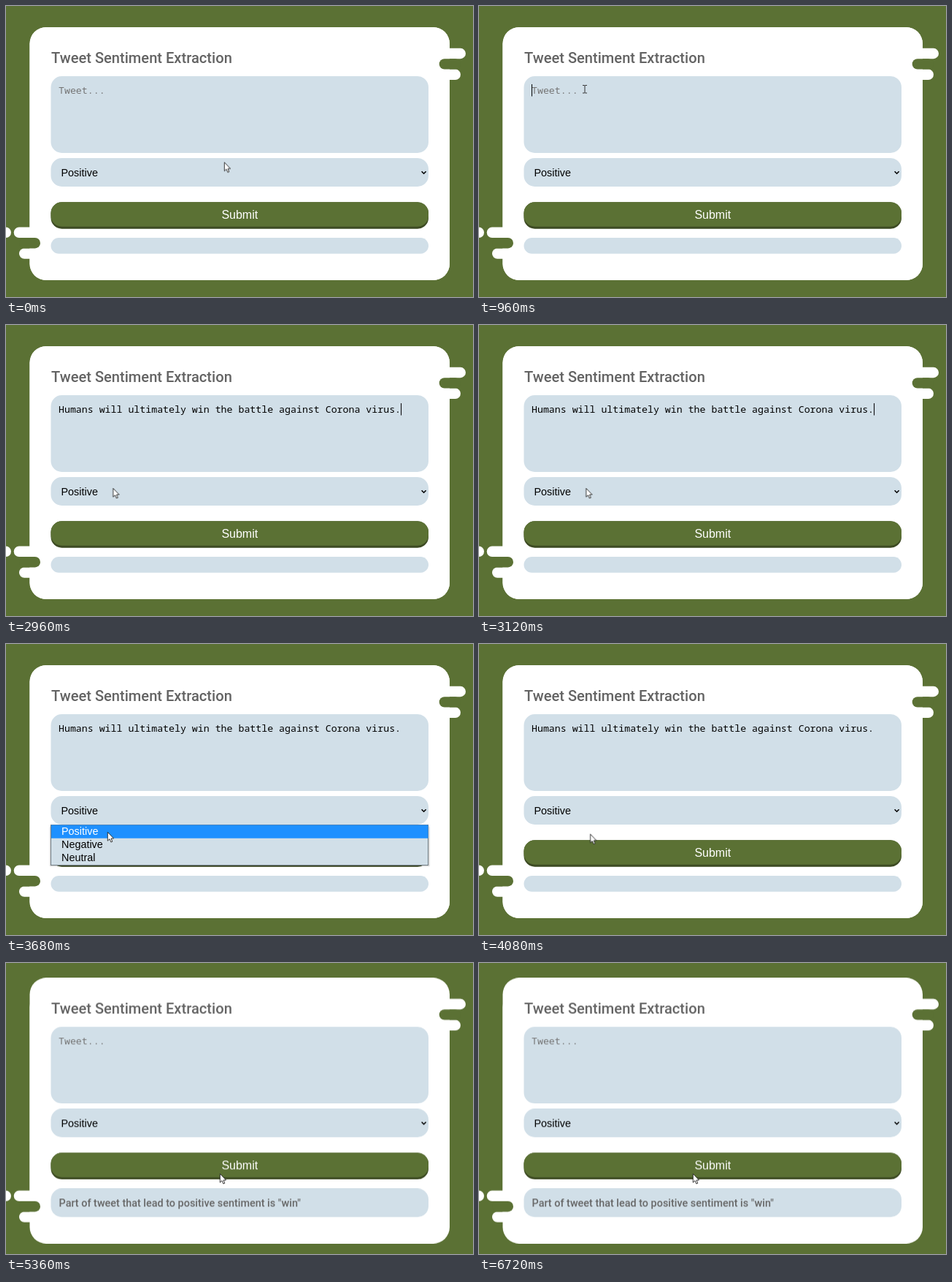
Recreate the animation shown at these times as an HTML page. Size 640 by 398 pixels, loop 7920 ms.

```html
<!DOCTYPE html>
<html lang="en">
<head>
<meta charset="utf-8">
<title>Tweet Sentiment Extraction</title>
<style>
  html, body { margin: 0; width: 100%; height: 100%; overflow: hidden; background: #5b7134; }
  svg { display: block; }
  .stage { width: 100vw; height: 100vh; }
  .white { fill: #fff; }
  .green { fill: #5b7134; }
  .dark { fill: #3d4b23; }
  .field { fill: #d1dfe8; }
  text { white-space: pre; }
  .head { font: 500 20.1px Roboto, sans-serif; fill: #636363; }
  .note { font: 500 14.4px Roboto, sans-serif; fill: #666; }
  .mono { font: 13.25px "Noto Sans Mono", monospace; }
  .hint { fill: #757575; }
  .ui { font: 14.4px "Liberation Sans", Arial, sans-serif; }
  .submit { font-size: 16px; fill: #fff; text-anchor: middle; }

  /* one shared 7.92 s loop; 80 ms is 1.0101% */
  .up, .down, .hint, .typed, .caret, .menu, .pressed, .before, .after, .beam, .arrow {
    animation: 7.92s step-end infinite;
  }
  .up { animation-name: up; }
  .down { animation-name: down; }
  .hint { animation-name: hint; }
  .typed { animation-name: typed; }
  .caret { animation-name: caret; }
  .menu { animation-name: menu; }
  .pressed { animation-name: pressed; }
  .before { animation-name: before; }
  .after { animation-name: after; }
  .beam { animation-name: beam; }
  .arrow { animation-name: arrow; }
  .type { animation: type 7.92s linear infinite; }
  .pointer { animation: pointer 7.92s ease-in-out infinite; }

  @keyframes up { 0% { transform: none } 64.6%, 100% { transform: translateY(-8.7px) } }
  @keyframes down { 0% { transform: none } 64.6%, 100% { transform: translateY(8.7px) } }
  @keyframes hint { 0% { opacity: 1 } 15.1% { opacity: 0 } 64.6%, 100% { opacity: 1 } }
  @keyframes typed { 0% { opacity: 0 } 15.1% { opacity: 1 } 64.6%, 100% { opacity: 0 } }
  @keyframes caret { 0% { opacity: 0 } 11.1% { opacity: 1 } 40.4%, 100% { opacity: 0 } }
  @keyframes menu { 0% { opacity: 0 } 41.4% { opacity: 1 } 50.5%, 100% { opacity: 0 } }
  @keyframes pressed { 0% { opacity: 0 } 55.5% { opacity: 1 } 64.6%, 100% { opacity: 0 } }
  @keyframes before { 0% { opacity: 1 } 64.6%, 100% { opacity: 0 } }
  @keyframes after { 0% { opacity: 0 } 64.6%, 100% { opacity: 1 } }
  @keyframes beam { 0% { opacity: 0 } 3.2% { opacity: 1 } 15.1% { opacity: 0 } 33.3% { opacity: 1 } 36.2%, 100% { opacity: 0 } }
  @keyframes arrow { 0% { opacity: 1 } 3.2% { opacity: 0 } 36.2%, 100% { opacity: 1 } }
  @keyframes type {
    0% { transform: none }
    15.1% { transform: none; animation-timing-function: steps(59) }
    32.3%, 100% { transform: translateX(469.05px) }
  }
  @keyframes pointer {
    0%, 1% { transform: translate(299px, 213.5px) }
    10.1%, 33.3% { transform: translate(145px, 114px) }
    37.3%, 41.4% { transform: translate(146.5px, 223px) }
    45.4%, 50.5% { transform: translate(139px, 257px) }
    55.5%, 100% { transform: translate(293px, 288px) }
  }
</style>
</head>
<body>
<svg class="stage" viewBox="0 0 640 398" preserveAspectRatio="none">
  <rect class="green" width="640" height="398"/>

  <!-- the card grows from both ends -->
  <g class="up"><rect class="white" x="32.5" y="29" width="575.5" height="346" rx="22.5"/></g>
  <g class="down">
    <rect class="white" x="32.5" y="29" width="575.5" height="346" rx="22.5"/>
    <rect class="white" x="-20" y="302.6" width="27" height="14.4" rx="7.2"/>
    <rect class="white" x="10.7" y="302.6" width="40" height="14.4" rx="7.2"/>
    <rect class="white" x="18" y="331.4" width="40" height="14.4" rx="7.2"/>
    <rect class="green" x="18" y="317" width="29" height="14.4" rx="7.2"/>
  </g>

  <g class="up">
    <rect class="white" x="590" y="57.8" width="40" height="14.4" rx="7.2"/>
    <rect class="white" x="583" y="86.6" width="40" height="14.4" rx="7.2"/>
    <rect class="green" x="593.7" y="72.2" width="29" height="14.4" rx="7.2"/>

    <text class="head" x="62" y="77.5">Tweet Sentiment Extraction</text>

    <rect class="field" x="61.5" y="96" width="517.5" height="105" rx="15"/>
    <text class="mono hint" x="72" y="120">Tweet...</text>
    <svg x="0" y="0" width="572" height="398">
      <g class="typed">
        <text class="mono" x="72" y="120">Humans will ultimately win the battle against Corona virus.</text>
        <g class="type"><rect class="field" x="72" y="105" width="505" height="22"/></g>
      </g>
      <g class="caret"><g class="type"><rect x="72" y="107" width="1" height="16.5"/></g></g>
    </svg>

    <rect class="field" x="61.5" y="208" width="517.5" height="39" rx="15"/>
    <text class="ui" x="75.5" y="232.5">Positive</text>
    <path d="M569.6 226.2l3 3 3-3" fill="none" stroke="#000" stroke-width="1.6"/>

    <rect class="dark" x="61.5" y="268.3" width="517.5" height="36.4" rx="15"/>
    <rect class="green" x="61.5" y="268.3" width="517.5" height="33.4" rx="15"/>
    <g class="pressed">
      <rect class="dark" x="61.5" y="268.3" width="517.5" height="36.4" rx="15"/>
      <rect x="61.7" y="268.7" width="517.3" height="35.8" rx="1.5" fill="none" stroke="#101010" stroke-width="1.6"/>
    </g>
    <text class="ui submit" x="320.3" y="290.6">Submit</text>

    <rect class="field before" x="61.5" y="317" width="517.5" height="21.8" rx="10.9"/>
    <g class="after">
      <rect class="field" x="61.5" y="317" width="517.5" height="39.2" rx="15"/>
      <text class="note" x="72.5" y="341.8">Part of tweet that lead to positive sentiment is "win"</text>
    </g>

    <g class="menu">
      <rect x="59.5" y="249" width="521.5" height="55.5" rx="2" opacity=".12"/>
      <rect class="field" x="61.5" y="247.5" width="517" height="55" stroke="#6f7b82"/>
      <rect x="62" y="247.5" width="516.5" height="18.2" fill="#1e90ff"/>
      <g class="ui">
        <text x="76" y="261" fill="#fff">Positive</text>
        <text x="76" y="279">Negative</text>
        <text x="76" y="297.2">Neutral</text>
      </g>
    </g>
  </g>

  <g class="pointer">
    <path class="arrow" d="M.3 .3V12.2L3 9.7 4.9 14 6.8 13.2 5 9H8.6Z" fill="#fff" stroke="#222" stroke-width=".9"/>
    <path class="beam" d="M-3-5.5H-.8L0-5 .8-5.5H3M0-5V4.5M-3 5H-.8L0 4.5 .8 5H3" fill="none" stroke="#333"/>
  </g>
</svg>
</body>
</html>
```
